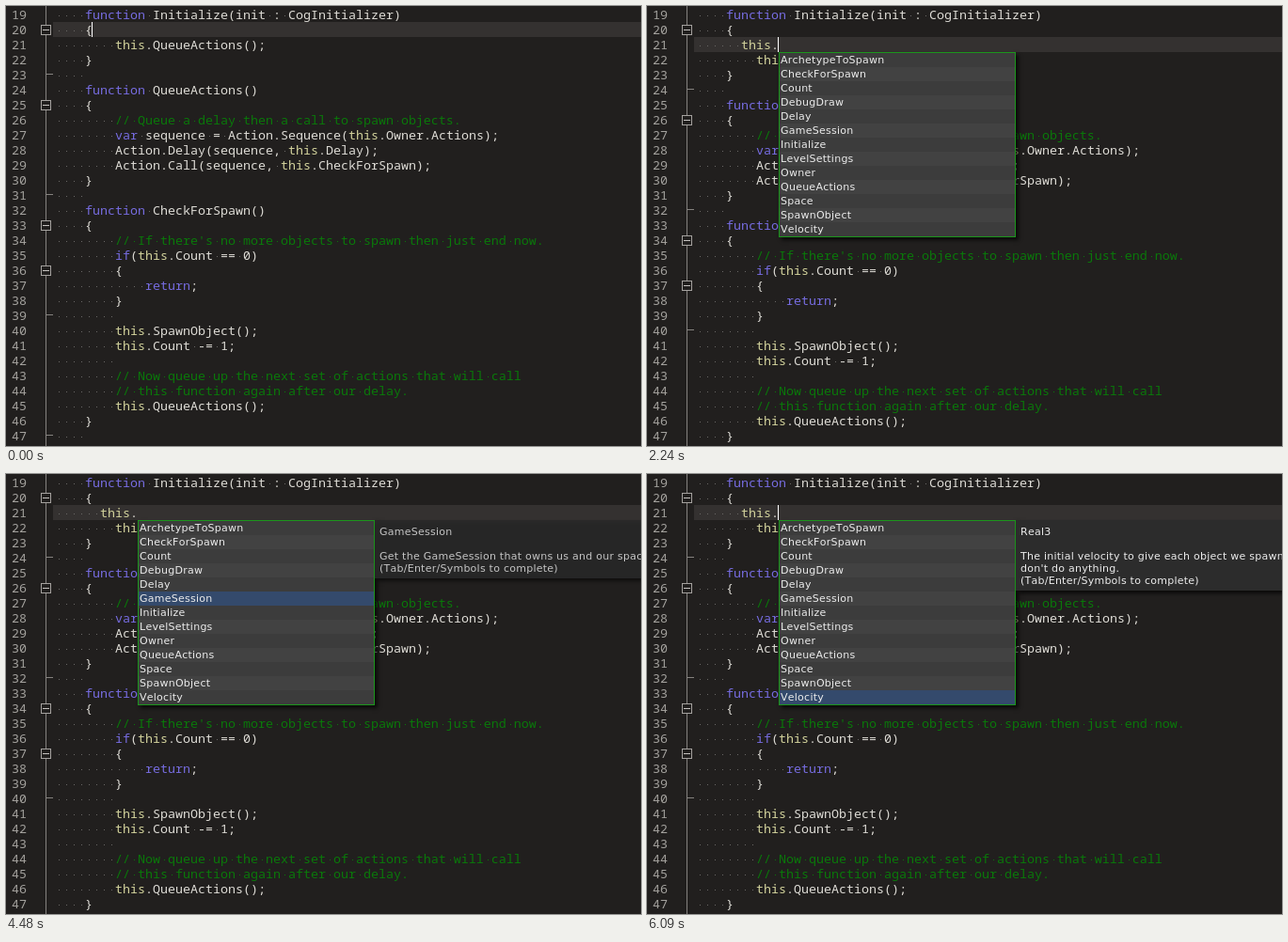
Write an HTML page with a canvas that moves like this. It is 675x468 px and loops after 6370 ms.

```html
<!DOCTYPE html>
<html lang="en">
<head>
<meta charset="utf-8">
<title>Code completion</title>
<style>
html, body { margin: 0; width: 100%; height: 100%; overflow: hidden; background: #211f1e; }
canvas { display: block; }
</style>
</head>
<body>
<canvas id="stage" width="675" height="468"></canvas>
<script>
const ctx = document.getElementById('stage').getContext('2d');
const LOOP = 6370, TICK = 70, CELL = 8, ROW = 16, FIRST_LINE = 19, CODE_X = 52;
const CODE_FONT = '13.333px "Noto Sans Mono", "DejaVu Sans Mono", monospace';
const LIST_FONT = '11px "DejaVu Sans", sans-serif';

const source = `    function Initialize(init : CogInitializer)
    {
        this.QueueActions();
    }
    
    function QueueActions()
    {
        // Queue a delay then a call to spawn objects.
        var sequence = Action.Sequence(this.Owner.Actions);
        Action.Delay(sequence, this.Delay);
        Action.Call(sequence, this.CheckForSpawn);
    }
    
    function CheckForSpawn()
    {
        // If there's no more objects to spawn then just end now.
        if(this.Count == 0)
        {
            return;
        }
        
        this.SpawnObject();
        this.Count -= 1;
        
        // Now queue up the next set of actions that will call
        // this function again after our delay.
        this.QueueActions();
    }
    `.split('\n');

const keywords = ['constructor', 'continue', 'delegate', 'delete', 'destructor', 'event',
  'function', 'get', 'not', 'return', 'set', 'struct', 'this'];
const members = ['ArchetypeToSpawn', 'CheckForSpawn', 'Count', 'DebugDraw', 'Delay', 'GameSession',
  'Initialize', 'LevelSettings', 'Owner', 'QueueActions', 'Space', 'SpawnObject', 'Velocity'];
const HINT = '(Tab/Enter/Symbols to complete)';
const help = {
  ArchetypeToSpawn: ['Archetype', '', 'The archetype to spawn.', HINT],
  CheckForSpawn: ['delegate ()', HINT],
  Count: ['Integer', '', 'How many of the specified archetypes to spawn.', HINT],
  DebugDraw: ['delegate ()', '', 'Called so that components can debug draw themselves.', HINT],
  Delay: ['Real', '', 'How long to wait between each spawn.', HINT],
  GameSession: ['GameSession', '', 'Get the GameSession that owns us and our space.', HINT],
  Velocity: ['Real3', '', 'The initial velocity to give each object we spawn. Zero will',
    "don't do anything.", HINT]
};
// time, selected member, fade ticks, opacity at first tick
const selections = [
  [2800, 0, 4, .3], [3220, 1, 4, .3], [3570, 2, 3, .6], [3850, 3, 3, .6], [4200, 4, 2, .8],
  [4480, 5, 3, .8], [4760, 4, 3, .6], [4970, 3, 3, .6], [5180, 2, 3, .6],
  [5530, 1, 2, .8], [5740, 0, 2, .8], [5950, 12, 3, .6]
];

function rect(x, y, w, h, color) {
  ctx.fillStyle = color;
  ctx.fillRect(x, y, w, h);
}

function text(str, x, y, color) {
  ctx.fillStyle = color;
  ctx.fillText(str, x, y);
}

function setFont(font, spacing) {
  ctx.font = font;
  ctx.letterSpacing = spacing;
}

function shadowed(x, y, w, h, color) {
  ctx.shadowColor = 'rgba(0,0,0,.7)';
  ctx.shadowBlur = 4;
  ctx.shadowOffsetX = ctx.shadowOffsetY = 3;
  rect(x, y, w, h, color);
  ctx.shadowColor = 'transparent';
}

const rowTop = row => 1 + row * ROW;

function tokenColor(token) {
  if (token.startsWith('//')) return '#0a780a';
  if (token === 'this') return '#d2d29c';
  return /^(function|var|if|return)$/.test(token) ? '#766ce0' : '#dedcd6';
}

function drawLine(line, row) {
  const y = rowTop(row);
  const comment = line.indexOf('//');
  for (const { 0: token, index } of line.matchAll(/\/\/.*|\w+|[^\w\s]+/g))
    text(token, CODE_X + index * CELL, y + 13, tokenColor(token));
  [...line].forEach((char, col) => {
    const inComment = comment >= 0 && col > comment;
    if (char === ' ') rect(CODE_X + col * CELL + 4, y + 9, 1, 1, inComment ? '#0a780a' : '#6a6866');
  });
}

function drawFolds(lines) {
  const gray = '#85827f';
  rect(42, 0, 1, 468, gray);
  lines.forEach((line, row) => {
    const y = rowTop(row);
    if (line.trim() === '{') {
      rect(37, y + 3, 11, 11, '#a5a29f');
      rect(38, y + 4, 9, 9, '#211f1e');
      rect(39, y + 8, 7, 1, '#c4c1be');
    } else if (!line.trim() && lines[row - 1].trim() === '}') {
      rect(42, y + 7, 8, 1, gray);
    }
  });
}

function drawEditor(lines, caretRow, caretOn) {
  rect(0, 0, 675, 468, '#211f1e');
  rect(50, rowTop(caretRow), 625, ROW, '#343130');
  setFont(CODE_FONT, '0px');
  lines.forEach((line, row) => {
    text(row + FIRST_LINE, 6, rowTop(row) + 13, '#a3a19d');
    drawLine(line, row);
  });
  drawFolds(lines);
  if (caretOn) rect(CODE_X + lines[caretRow].length * CELL - 1, rowTop(caretRow), 1, ROW, '#fff');
}

function drawList(items, selected, x, offset, border) {
  const w = 252, h = items.length * 15 + 2 + offset;
  shadowed(x, 49, w, h, border);
  rect(x + 1, 50, w - 2, h - 2, '#3c3c3c');
  setFont(LIST_FONT, '.25px');
  items.forEach((item, i) => {
    const y = 50 + offset + i * 15;
    rect(x + 1, y, w - 2, 15, i === selected ? '#344a6c' : i % 2 ? '#424242' : '#3c3c3c');
    text(item, x + 2, y + 11, '#ececec');
  });
}

function drawTip(lines, x, alpha) {
  setFont(LIST_FONT, '.25px');
  ctx.globalAlpha = alpha;
  const w = Math.round(Math.max(...lines.map(line => ctx.measureText(line).width))) + 10;
  shadowed(x, 49, w, lines.length * 13 + 10, '#2c2c2c');
  lines.forEach((line, i) => text(line, x + 5, 65 + i * 13, '#ececec'));
  ctx.globalAlpha = 1;
}

function draw(t) {
  const inserted = t >= 280;
  const typed = t < 840 ? '' : t < 1120 ? 't' : t < 1260 ? 'this' : 'this.';
  const lines = source.slice();
  if (inserted) {
    lines.splice(2, 0, '      ' + typed);
    lines.pop();
  }
  const caretOn = t < 1610 || Math.floor((t - 1610) / 600) % 2 === 1;
  drawEditor(lines, inserted ? 2 : 1, caretOn);

  if (typed === 't') {
    drawList(keywords, 12, 108, 3, '#a51c1c');
    rect(349, 50, 10, 198, '#383838');
    rect(349, 227, 10, 10, '#262626');
    drawTip(['', '(Tab/Enter to complete)'], 360, Math.min(1, (1 + (t - 840) / TICK) / 3));
  } else if (typed === 'this.') {
    const current = selections.filter(s => s[0] <= t).pop();
    drawList(members, current ? current[1] : -1, 140, 0, '#1c961c');
    if (current) {
      const [start, index, ticks, opacity] = current;
      const progress = Math.min(1, (t - start) / TICK / (ticks - 1));
      drawTip(help[members[index]], 392, opacity + (1 - opacity) * progress);
    }
  }
}

ctx.fontKerning = 'none';
function frame() {
  const t = performance.now() % LOOP;
  draw(Math.floor(t / TICK) * TICK);
  requestAnimationFrame(frame);
}
frame();
</script>
</body>
</html>
```
